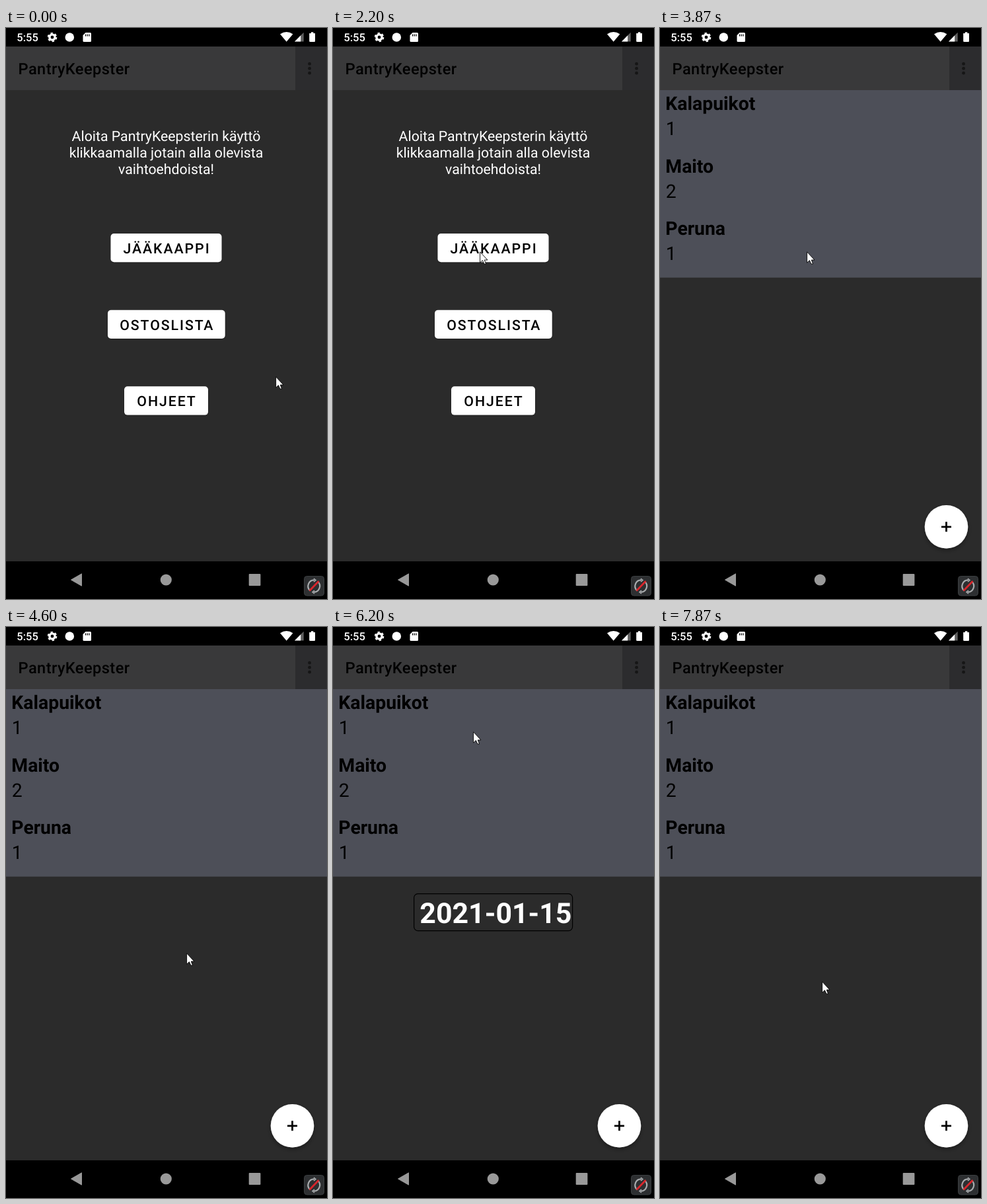
Recreate the animation shown at these times as an HTML page. Size 486 px wide and 864 px high, loop 8000 ms.

```html
<!DOCTYPE html>
<html lang="fi">
<head>
<meta charset="utf-8">
<title>PantryKeepster</title>
<style>
  html, body { margin: 0; width: 100%; height: 100%; overflow: hidden; background: #2b2b2b; }
  svg { display: block; width: 100vw; height: 100vh; }
  text { font-family: Roboto, sans-serif; white-space: pre; text-rendering: geometricPrecision; }
  .clock { font-size: 16.5px; font-weight: 500; fill: #fff; }
  .title { font-size: 23.63px; font-weight: 450; letter-spacing: .42px; }
  .intro { font-size: 21.3px; fill: #fff; text-anchor: middle; }
  .button { font-size: 21.3px; font-weight: 450; letter-spacing: .0893em; text-anchor: middle; }
  .item { font-size: 28.35px; }
  .bold { font-weight: 700; }
  .toast { font-size: 42.9px; font-weight: 700; fill: #fff; }
</style>
</head>
<body>
<svg viewBox="0 0 486 864" preserveAspectRatio="none">
  <defs>
    <filter id="shadow" x="-30%" y="-30%" width="160%" height="170%">
      <feDropShadow dx="0" dy="3" stdDeviation="3" flood-color="#000" flood-opacity=".35"/>
    </filter>
    <filter id="soft" x="-10%" y="-20%" width="120%" height="150%">
      <feDropShadow dx="0" dy="1" stdDeviation="1" flood-color="#000" flood-opacity=".25"/>
    </filter>
    <clipPath id="fridgeShape"><rect x="158.5" y="311" width="168" height="43.3" rx="5"/></clipPath>
  </defs>

  <rect width="486" height="864" fill="#2b2b2b"/>

  <!-- App bar -->
  <rect y="28" width="486" height="66" fill="#39393a"/>
  <rect x="438" y="28" width="48" height="66" fill="#2c2c2e"/>
  <text class="title" x="18.5" y="70">PantryKeepster</text>
  <g fill="#161616">
    <circle cx="459.6" cy="54.2" r="2.4"/>
    <circle cx="459.6" cy="61.2" r="2.4"/>
    <circle cx="459.6" cy="68.2" r="2.4"/>
  </g>

  <!-- Status bar -->
  <rect width="486" height="28"/>
  <text class="clock" x="16.3" y="20">5:55</text>
  <g fill="none" stroke="#fff">
    <circle cx="70" cy="14" r="4.1" stroke-width="3.4"/>
    <circle cx="70" cy="14" r="6.3" stroke-width="2" stroke-dasharray="3.3 3.3"/>
  </g>
  <circle cx="96.3" cy="14" r="6.8" fill="#fff"/>
  <path d="M120.5 7H127.5Q129 7 129 8.5V19.5Q129 21 127.5 21H118Q116.5 21 116.5 19.5V11Z" fill="#fff"/>
  <path d="M120.5 9.5V12.5M123.2 9.5V12.5M125.9 9.5V12.5" stroke="#000" stroke-width="1.3"/>
  <path d="M424.7 20.7L415 9.3Q424.7 2.7 434.4 9.3Z" fill="#fff"/>
  <path d="M450.7 6.8V20.5H437Z" fill="#606060"/>
  <path d="M446.2 11.3V20.5H437Z" fill="#fff"/>
  <path d="M459.2 8H461.8V6.3H465.4V8H468V19.8Q468 21 466.8 21H460.4Q459.2 21 459.2 19.8Z" fill="#fff"/>

  <!-- Start page -->
  <g id="home">
    <text class="intro" x="242.5" y="171">Aloita PantryKeepsterin käyttö</text>
    <text class="intro" x="242.5" y="196">klikkaamalla jotain alla olevista</text>
    <text class="intro" x="242.5" y="220.5">vaihtoehdoista!</text>
    <g fill="#fff" filter="url(#soft)">
      <rect x="158.5" y="311" width="168" height="43.3" rx="5"/>
      <rect x="154" y="426.7" width="177.7" height="43.3" rx="5"/>
      <rect x="179" y="542.3" width="127" height="43.3" rx="5"/>
    </g>
    <g clip-path="url(#fridgeShape)">
      <circle id="ripple" cx="228" cy="335" r="61.3" fill="#cbcbcb"/>
    </g>
    <text class="button" x="243.5" y="340.8">JÄÄKAAPPI</text>
    <text class="button" x="243.8" y="456.5">OSTOSLISTA</text>
    <text class="button" x="243.5" y="572.2">OHJEET</text>
  </g>

  <!-- Fridge contents -->
  <g id="fridge">
    <rect y="94" width="486" height="283.7" fill="#4d4f58"/>
    <g id="items"></g>
    <circle cx="433.5" cy="754.7" r="32.8" fill="#fff" filter="url(#shadow)"/>
    <path d="M426 754.8H441M433.5 747.3V762.3" stroke="#000" stroke-width="2.8"/>
  </g>
  <g id="toast">
    <rect x="122.6" y="403.6" width="240" height="56" rx="6" fill="#2b2b2b" stroke="#000" stroke-width="1.2"/>
    <text class="toast" x="131.3" y="448.3">2021-01-15</text>
  </g>

  <!-- Navigation bar -->
  <rect y="807" width="486" height="57"/>
  <g fill="#999">
    <path d="M98.5 835L114.5 825.8V844.2Z" stroke="#999" stroke-linejoin="round"/>
    <circle cx="242.3" cy="835" r="8.6"/>
    <rect x="367.7" y="826" width="17.7" height="18" rx="1"/>
  </g>
  <rect x="451.5" y="829.5" width="30" height="29.5" rx="4" fill="#2d2f31" stroke="#3b3e40"/>
  <g fill="none" stroke="#a9acae" stroke-width="2.2">
    <path d="M460.5 851.5A9.2 9.2 0 0 1 467 835.4M472 837.5A9.2 9.2 0 0 1 466 853.6"/>
    <path d="M466 833L469 835.5L466 838M467 851L464 853.6L467 856" stroke-width="1.6"/>
  </g>
  <path d="M459.5 851.5L473.5 837" stroke="#d8262c" stroke-width="2.8"/>

  <path id="cursor" d="M.6 .8V17.2L4.4 13.6L6.9 19H9.6L7.3 13H12Z" fill="#fff" stroke="#000" stroke-width=".9"/>
</svg>
<script>
  const LOOP = 8000, TICKS_PER_MS = 15 / 1000;
  const el = id => document.getElementById(id);

  const smooth = p => p * p * (3 - 2 * p);
  const linear = p => p;
  const easeIn = p => p ** 1.5;
  const easeOut = p => 1 - (1 - p) ** 2;
  const hold = p => p < 1 ? 0 : 1;

  // Pointer path: tick, x, y, easing used to arrive there
  const path = [
    [0, 408, 527],
    [2, 408, 531, hold],
    [19, 408, 531, hold],
    [32, 222, 340, smooth],
    [33, 222, 338, hold],
    [63, 222, 338, hold],
    [69, 273, 493, smooth],
    [78, 273, 493, hold],
    [79, 273, 495, hold],
    [83, 228, 246, smooth],
    [89, 212, 158, easeOut],
    [93, 212, 158, hold],
    [102, 203, 380, easeIn],
    [105, 237, 472, linear],
    [109, 245, 536, easeOut],
    [120, 245, 536, hold]
  ];

  function pointerAt(tick) {
    const i = path.findIndex(key => key[0] > tick);
    const [t0, x0, y0] = path[i - 1];
    const [t1, x1, y1, ease] = path[i];
    const p = ease((tick - t0) / (t1 - t0));
    return [x0 + (x1 - x0) * p, y0 + (y1 - y0) * p].map(Math.round);
  }

  el('items').innerHTML = [['Kalapuikot', 1], ['Maito', 2], ['Peruna', 1]].map(([name, count], i) => {
    const y = 124.2 + i * 94.5;
    return `<text class="item bold" x="8.3" y="${y}">${name}</text>` +
           `<text class="item" x="8.8" y="${y + 37.8}">${count}</text>`;
  }).join('');

  const show = (id, visible) => el(id).setAttribute('visibility', visible ? 'visible' : 'hidden');

  function draw() {
    const time = performance.now() % LOOP;
    const tick = Math.min(119, Math.floor((time + 4) * TICKS_PER_MS));
    show('home', tick < 58);
    show('ripple', tick === 57);
    show('fridge', tick >= 58);
    show('toast', tick >= 93 && tick < 118);
    el('cursor').setAttribute('transform', `translate(${pointerAt(tick)})`);
    requestAnimationFrame(draw);
  }
  draw();
</script>
</body>
</html>
```
